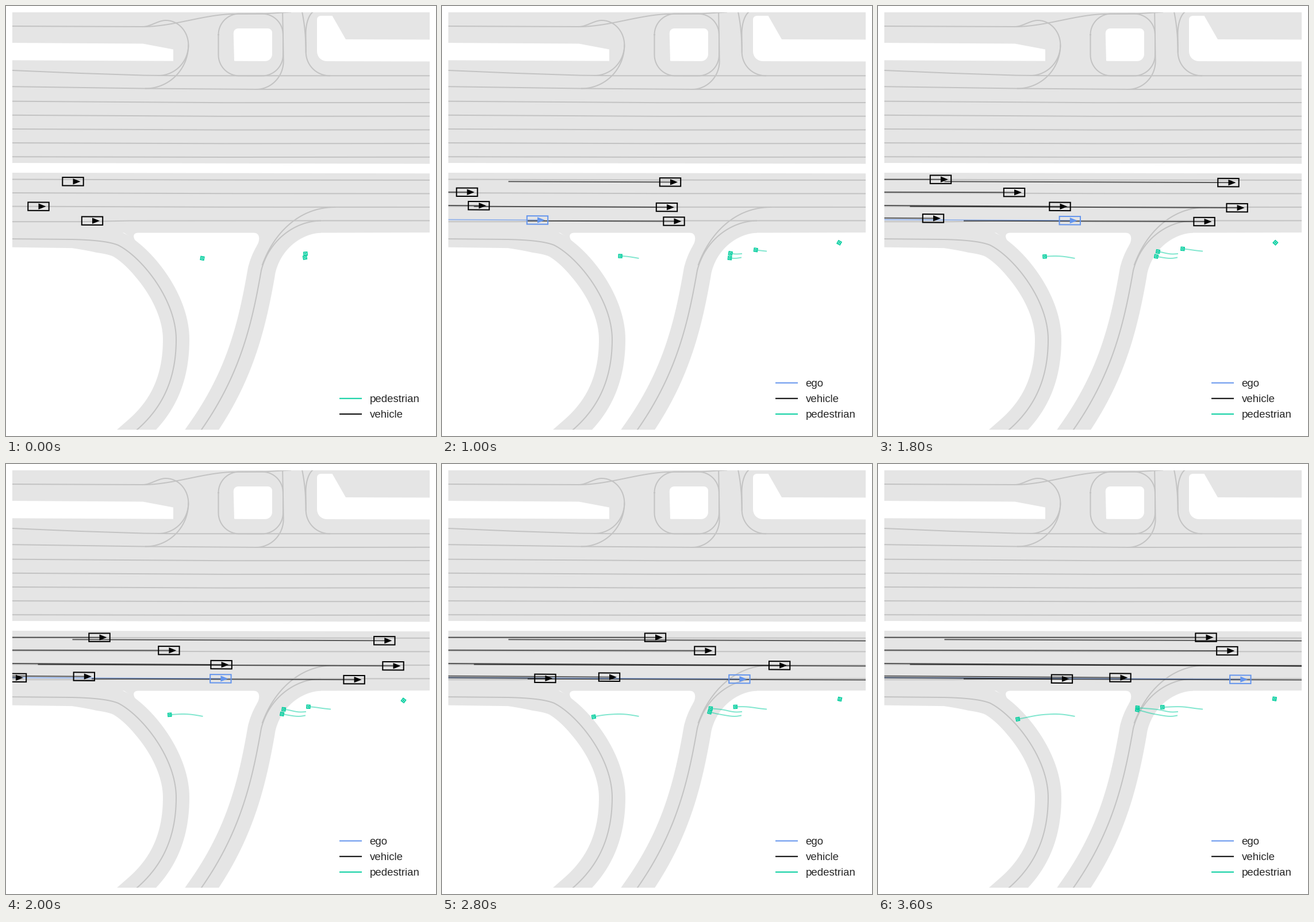
These frames come from a looping animation (748 by 748 pixels, 3800 ms). A matplotlib script:

```python
import numpy as np
import matplotlib.pyplot as plt
from matplotlib.animation import FuncAnimation
from matplotlib.patches import Polygon

SIZE, DPI, LO, HI = 748, 88, 11, 737
PX = 72 / DPI
FRAMES, STEP = 19, 200
ROAD, LANE = "#e5e5e5", "#c3c3c3"
COLORS = {"ego": "#6495ed", "vehicle": "#000000", "pedestrian": "#06cfa0"}

fig = plt.figure(figsize=(SIZE / DPI, SIZE / DPI), dpi=DPI, facecolor="white")
ax = fig.add_axes([LO / SIZE, LO / SIZE, (HI - LO) / SIZE, (HI - LO) / SIZE])
ax.set_xlim(LO, HI)
ax.set_ylim(HI, LO)
ax.axis("off")


# ---- curves ----

def bezier(a, b, c, d, n=40):
    t = np.linspace(0, 1, n)[:, None]
    a, b, c, d = np.array([a, b, c, d], float)
    return (1 - t) ** 3 * a + 3 * t * (1 - t) ** 2 * b + 3 * t * t * (1 - t) * c + t ** 3 * d


def arc(cx, cy, rx, ry, start, end):
    """Elliptic arc; angles in degrees, clockwise from the right."""
    a = np.radians(np.linspace(start, end, 40))
    return np.c_[cx + rx * np.cos(a), cy + ry * np.sin(a)]


def ease(x0, y0, x1, y1):
    s = np.linspace(0, 1, 40)
    return np.c_[x0 + (x1 - x0) * s, y0 + (y1 - y0) * s * s * (3 - 2 * s)]


def join(*parts):
    return np.vstack([np.atleast_2d(p) for p in parts])


def rounded(corners):
    """Polygon from (x, y, radius) corners."""
    pts = np.array(corners, float)
    out = []
    for i, (*p, r) in enumerate(pts):
        p = np.array(p)
        a, b = (q + (p - q) * (1 - r / np.hypot(*(p - q)))
                for q in (pts[i - 1, :2], pts[(i + 1) % len(pts), :2]))
        out.append(bezier(a, a + (p - a) * 0.6, b + (p - b) * 0.6, b, 12))
    return join(*out)


def offset(pts, amount):
    d = np.gradient(pts, axis=0)
    d /= np.hypot(*d.T)[:, None]
    return pts + np.reshape(amount, (-1, 1)) * np.c_[-d[:, 1], d[:, 0]]


# ---- static map ----

def area(*parts, color=ROAD):
    ax.add_patch(Polygon(join(*parts), fc=color, ec="none", zorder=1))


def lane(*parts):
    pts = join(*parts)
    ax.plot(pts[:, 0], pts[:, 1], color=LANE, lw=2 * PX, zorder=2, snap=False)


def ramp(pts, right, left):
    """Road along pts; right and left map distance to half width."""
    dist = np.r_[0, np.cumsum(np.hypot(*np.diff(pts, axis=0).T))]
    area(offset(pts, np.interp(dist, *right)),
         offset(pts, -np.interp(dist, *left))[::-1])


def draw_upper_roads():
    area([(0, 0), (748, 0), (748, 274.5), (0, 273)])
    area([(0, 64), (238, 65.5), (291, 75.5), (291, 95.7), (0, 94.3)], color="white")
    area(rounded([(395.5, 39, 9), (463, 39, 8), (463, 96, 13), (397, 95.7, 1)]),
         color="white")
    area(rounded([(541, 17, 7), (567.5, 17, 0), (591, 58, 0), (748, 58.5, 0),
                  (748, 96.5, 0), (541, 96, 18)]), color="white")

    lane((0, 35), ease(238, 36, 400, 13.8), (450, 13.5), (495, 10.5))
    lane(ease(238, 36, 278, 25), arc(278, 68, 39.3, 43, -90, 0),
         arc(265, 68, 52.3, 53, 0, 90))
    lane(arc(243, 68, 74.3, 75.5, 0, 90))
    lane((0, 111.5), (130, 117), (240, 120.6), (300, 121.3), (748, 121.3))
    lane((0, 140), (240, 143.5), (440, 145), (748, 144.8))

    r = 36.5
    ring = [arc(cx, cy, r, r, a, a + 90) for cx, cy, a in
            [(406, 50, 180), (445.5, 50, 270), (445.5, 85, 0), (406, 85, 90)]]
    lane(*ring, ring[0][0])
    lane((481, 5), (482, 55), arc(435, 96, 47.6, 49, 0, 90))
    lane(bezier((514, 5), (518, 24), (521.5, 45), (521.7, 80)),
         arc(563, 80, 41.3, 41.3, 180, 90))
    lane(arc(540, 48, 18.5, 40, 270, 180), (521.7, 80))

    for k in range(5):
        right = 168 + 23.7 * k
        lane((0, 165.6 + 24.15 * k), (380, right + 0.2), (748, right))


def draw_lower_roads():
    area([(0, 290), (748, 291.3), (748, 394), (545, 394.5), (0, 394.5)])

    west = join((0, 405), bezier((115, 406), (155, 407), (180, 410), (195, 416)),
                bezier((195, 416), (235, 436), (296, 510), (296, 580)),
                bezier((296, 580), (296, 655), (268, 702), (228, 737)), (188, 772))
    south = join(bezier((547, 373.6), (505, 374), (458, 405), (444, 460)),
                 bezier((444, 460), (428, 552), (408, 640), (340, 737)), (312, 777))
    ramp(west, ([110, 160, 260], [14.5, 20.5, 23]), ([0, 1], [23, 23]))
    ramp(south, ([0, 1], [23.5, 23.5]), ([0, 150], [21, 25]))
    # rounded tips of the island between the ramps
    area(bezier((228, 412), (219, 402), (221, 394.5), (230, 394.5)), (200, 390))
    area(bezier((436, 418), (444, 404), (440, 394.5), (431, 394.5)), (460, 390))

    for k in range(3):
        lane((0, 301.5 + 23.5 * k), (380, 302.6 + 23.6 * k), (748, 302.9 + 23.5 * k))
    lane((0, 375.2), (130, 375.2), (215, 373.6), (748, 373.4))
    lane(west)
    lane(south)
    lane(bezier((572, 350), (510, 350), (466, 395), (446, 450)))


# ---- agents ----

def driver(t0, x0, speed, y0, y1, bend=0, jerk=0):
    """Cubic motion in seconds along a line from y0 (x = 0) to y1 (right edge)."""
    def path(steps):
        x = np.polyval([jerk, bend, speed, x0], steps * STEP / 1000 - t0)
        return np.c_[x, y0 + (y1 - y0) * x / HI]
    return path


def walker(keys, *pts):
    """Smooth path through a few points at the given steps."""
    k, p = np.array(keys, float), np.array(pts, float)
    slope = np.gradient(p, k, axis=0)

    def path(steps):
        i = np.clip(np.searchsorted(k, steps, "right") - 1, 0, len(k) - 2)
        h = (k[i + 1] - k[i])[:, None]
        s = (steps - k[i])[:, None] / h
        return ((1 + 2 * s) * (1 - s) ** 2 * p[i] + s * (1 - s) ** 2 * h * slope[i]
                + s * s * (3 - 2 * s) * p[i + 1] + s * s * (s - 1) * h * slope[i + 1])
    return path


def swivel(step):
    return np.radians(8 + 37 * np.exp(-((step - 8) / 4) ** 2))


# kind, first step, path
AGENTS = [
    ("ego", 0, driver(0.4, 35, 219, 371.6, 375.2, 0.9, -3.5)),
    ("vehicle", 0, driver(0, 116.5, 277.1, 304.9, 307.6, 9.9, -6.5)),
    ("vehicle", 0, driver(0, 56.5, 336.5, 348.4, 351.5, 10, -12)),
    ("vehicle", 0, driver(0, 150, 291.4, 373.2, 375.6, -44, 6.1)),
    ("vehicle", 0, driver(1, 43.5, 247.8, 323.7, 325.3, -5.4, -2.5)),
    ("vehicle", 0, driver(1, 64, 335.6, 346.9, 351.3, -25)),
    ("vehicle", 0, driver(1.8, 109, 269, 301.7, 301.6, -7)),
    ("vehicle", 0, driver(1.8, 96, 198.5, 368.7, 373.8, 4.4, -7.9)),
    ("vehicle", 0, driver(2.4, 101, 203.1, 371.7, 376.6, -17.2)),
    ("pedestrian", 0, walker((0, 2, 9, 18), (341.5, 438.8), (327.5, 436.4),
                             (290, 435.8), (243.2, 443.8))),
    ("pedestrian", 0, walker((0, 2, 9, 18), (521, 431), (513, 431.5),
                             (487, 427.2), (451.3, 424))),
    ("pedestrian", 0, walker((0, 2, 9, 18), (520, 437.6), (512.7, 438.8),
                             (484, 435.6), (451.3, 427.6))),
    ("pedestrian", 1, walker((1, 2, 9, 18), (564, 426.5), (559, 426),
                             (530, 422.4), (494.8, 423))),
    ("pedestrian", 5, walker((5, 9, 14, 18), (691, 411.8), (691.3, 411.7),
                             (692, 409), (689.8, 408.5)), swivel),
]


def agent_artists(now, kind, first, path, turn=None):
    if now < first:
        return []
    color, walking = COLORS[kind], kind == "pedestrian"
    trail = path(np.arange(first, now + 1))
    out = ax.plot(trail[:, 0], trail[:, 1], color=color, lw=2 * PX,
                  alpha=0.5 if walking else 0.6, zorder=3, snap=False)
    spot = trail[-1]
    if spot[0] > HI + 3:
        return out

    if turn:
        angle = turn(now)
    else:
        back = max(now - 1, first)
        a, b = path(np.array([back, back + 1]))
        angle = np.arctan2(*(b - a)[::-1])
    cos, sin = np.cos(angle), np.sin(angle)
    rot = np.array([(cos, sin), (-sin, cos)])
    half, edge = ((2.8, 2.8), 1.8) if walking else ((18.2, 7.2), 2)
    box = np.array([(-1, -1), (1, -1), (1, 1), (-1, 1)]) * half
    arrow = np.array([(0, -5.2), (13, 0), (0, 5.2)])
    if walking:
        arrow = arrow * (0.28, 0.42) - (1.2, 0)
    for shape, style in [(box, dict(fc="none", ec=color, lw=edge * PX)),
                         (arrow, dict(fc=color, ec="none"))]:
        out.append(ax.add_patch(Polygon(shape @ rot + spot, joinstyle="miter",
                                        snap=False, zorder=4, **style)))
    return out


def legend_artists(now):
    rows = ["ego", "vehicle", "pedestrian"] if now >= 5 else ["ego", "pedestrian", "vehicle"]
    out = []
    for i, name in enumerate(rows):
        if name == "ego" and now < 2:
            continue
        y = 655.6 + 27.1 * i
        out += ax.plot([581, 618], [y, y], color=COLORS[name], lw=2 * PX,
                       solid_capstyle="projecting", snap=False, zorder=5)
        out.append(ax.text(632.5, y + 6.4, name, family="Liberation Sans",
                           size=18.67 * PX, color="#262626", va="baseline", zorder=5))
    return out


shown = []


def draw(now):
    while shown:
        shown.pop().remove()
    for agent in AGENTS:
        shown.extend(agent_artists(now, *agent))
    shown.extend(legend_artists(now))
    return shown


draw_upper_roads()
draw_lower_roads()
anim = FuncAnimation(fig, draw, frames=FRAMES, interval=STEP, repeat=True,
                     repeat_delay=0, blit=False)
plt.show()
```
